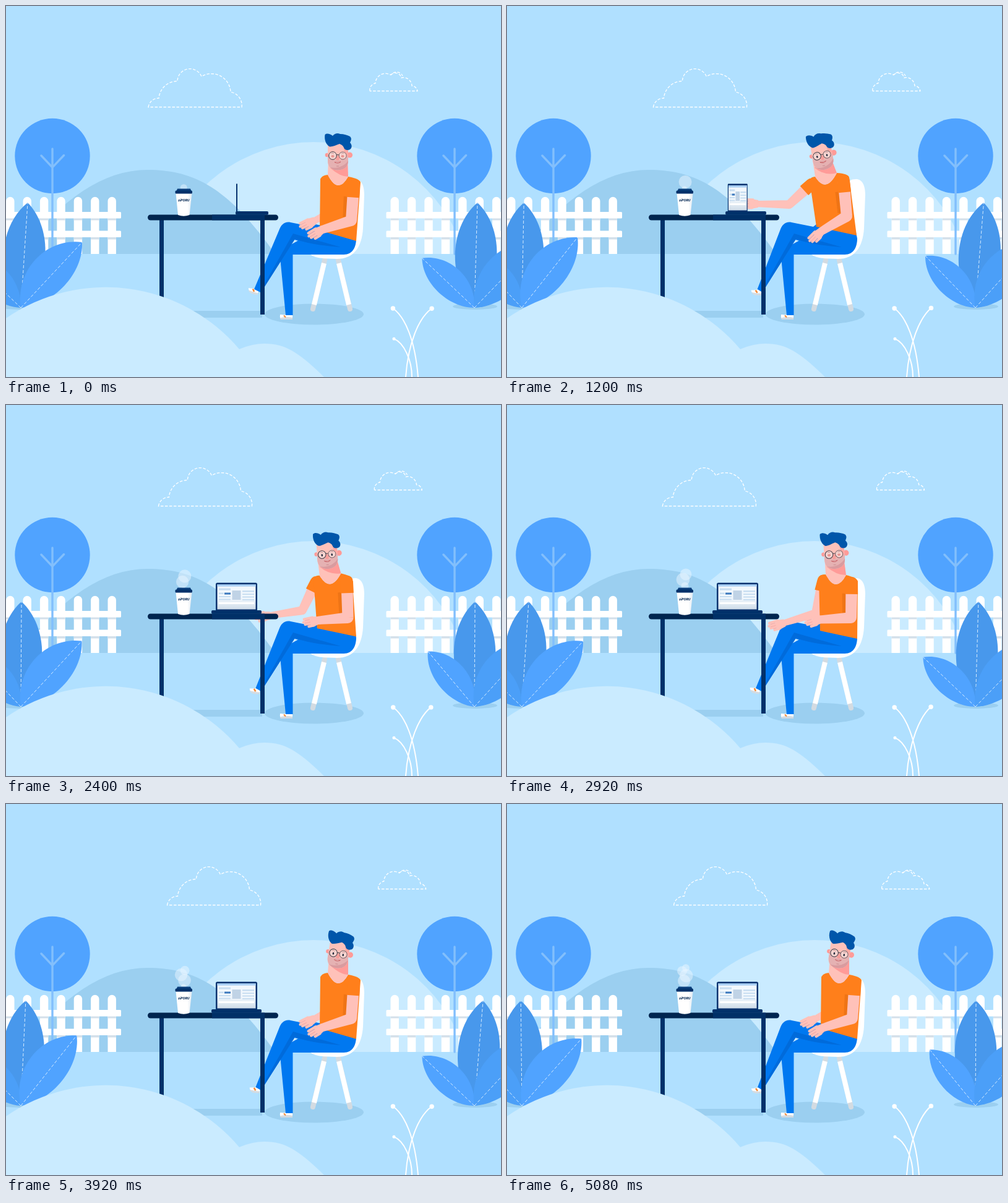
An HTML page for the animation above (5120 ms loop, 800 by 600 pixels).

```html
<!DOCTYPE html>
<html lang="en">
<head>
<meta charset="utf-8">
<title>Working in the garden</title>
<style>
  html, body { margin: 0; width: 100%; height: 100%; overflow: hidden; background: #b0e0ff; }
  svg { display: block; width: 100vw; height: 100vh; }
</style>
</head>
<body>
<svg viewBox="0 0 800 600">
  <defs>
    <g id="cloudBig"><path d="M230 163.500A17 17 0 0 1 247 149A30 30 0 0 1 277 121.500A20.300 20.300 0 0 1 316 114A31 31 0 0 1 363 139A22 22 0 0 1 381 163.500Z"/></g>
    <g id="cloudSmall">
      <path d="M588 137.500A11 11 0 0 1 597 125A16.500 16.500 0 0 1 622 111.500A11 11 0 0 1 641 113"/>
      <path d="M622 111.500A10 10 0 0 1 639 116A14 14 0 0 1 656 129A10 10 0 0 1 665 137.500H588"/>
    </g>
    <g id="tree">
      <circle cx="75" cy="242.500" r="60.700" fill="#50a3ff"/>
      <path d="M75 231V401M57 242L75 261L93.500 241.500" fill="none" stroke="#82bffc" stroke-width="3.400" stroke-linecap="round"/>
    </g>
    <linearGradient id="cupShade"><stop offset=".72" stop-color="#fff"/><stop offset="1" stop-color="#dfe9f2"/></linearGradient>
    <linearGradient id="screenShade" x2="0" y2="1"><stop offset=".55" stop-color="#f2f8fd"/><stop offset="1" stop-color="#cfdce8"/></linearGradient>
  </defs>

  <rect width="800" height="600" fill="#b0e0ff"/>
  <path d="M253.500 401A255 255 0 0 1 741.500 401Z" fill="#caebff"/>
  <path d="M21 401Q124.500 265 228 265C304 265 358 293 435 401Z" fill="#9bcff0"/>
  <g fill="none" stroke="#fff" stroke-width="1.300" stroke-dasharray="4.500 2.500">
    <use href="#cloudBig" id="c1"/><use href="#cloudSmall" id="c2"/>
  </g>

  <g id="fences"></g>
  <use href="#tree"/><use href="#tree" x="650"/>
  <ellipse cx="24" cy="486" rx="36" ry="5" fill="#9bcff0"/>
  <ellipse cx="758" cy="486" rx="36" ry="5" fill="#9bcff0"/>
  <g id="leaves"></g>

  <path d="M290 493H414V504H290Z" fill="#9bcff0"/>
  <ellipse cx="498" cy="498.500" rx="80" ry="17" fill="#9bcff0"/>

  <g id="chair" fill="none" stroke-linecap="round">
    <path d="M515 411L496 490M537 411L556 490" stroke="#d3dbe2" stroke-width="8"/>
    <path d="M514 416L498 483M538 416L554 483" stroke="#fff" stroke-width="8" stroke-linecap="butt"/>
    <path d="M492 402C500 408 515 409 535 409C562 409 575 390 577 360L579 305C579 290 574 280 564 280C556 280 551 283 550 290V398Z" fill="#fff"/>
  </g>

  <g id="man">
    <path d="M443 499C450 500 457 499 463 499V506.500H444Q442 503 443 499Z" fill="#fff"/>
    <path d="M443 504.500Q453 502 463 504V507H444Z" fill="#d3dbe2"/>
    <path d="M449 500.500L452 503.500" stroke="#f58a35" stroke-width="2"/>
    <path d="M442 396L452 500H463.500V402H546C560 402 566 390 566 376L500 364Z" fill="#0078f0"/>
    <g id="foot">
      <path d="M412 458C406 458 402 460 395 460Q395 465 402 467H411Z" fill="#fff"/>
      <path d="M395.500 463.500Q403 465 412 465L411 468H402Q397 467 395.500 463.500Z" fill="#d3dbe2"/>
      <path d="M402 460L405 464" stroke="#f58a35" stroke-width="2.500"/>
    </g>
    <path id="crossed" fill="#0078f0"/>
    <path d="M464 368L541 390Q495 387 467 377L418 454L413 458Z" fill="#006bdb"/>
    <g fill="#ffc1b9">
      <path id="farArm"/>
      <g id="farHand"></g>
    </g>
    <path id="farSleeve" fill="#ff7f1b"/>
    <path id="torso" fill="#ff7f1b"/>
    <path id="armShade" fill="#ef7415"/>
    <path id="neck" fill="#ffc1b9"/>
    <path id="neckShade" fill="#ff9b98"/>
    <g id="head">
      <circle cx="19.500" cy="-1" r="4.600" fill="#ff9b98"/>
      <circle cx="-17" cy="-1" r="3.300" fill="#ff9b98"/>
      <path d="M-16 -20H17V8C17 19 9 23.500 0 23.500C-10 23.500 -16 18 -16 8Z" fill="#ffc1b9"/>
      <path d="M9 -19H17V4H12Z" fill="#ffa9a4"/>
      <path d="M-16 -3V8C-16 18 -10 23.500 0 23.500C9 23.500 17 19 17 8V-1Q10 7 0 7T-16 -3Z" fill="#e5b1b2"/>
      <path d="M17 8C17 19 9 23.500 0 23.500C-5 23.500 -9 22 -12 19C0 22 12 16 17 8Z" fill="#d99b9f"/>
      <path d="M-20.500 -34C-17 -37 -12 -35 -8 -32C-5 -36 0 -37 4 -35C10 -35 16 -33 20 -31C23 -28 22 -25 20 -21C24 -17 23 -12 20 -10C16 -8 11 -9 10 -13C9 -16 6 -18 3 -19C-3 -17 -8 -14 -13 -14.500C-19 -18 -22 -26 -20.500 -34Z" fill="#0056aa"/>
      <ellipse cx="0" cy="4" rx="3" ry="4" fill="#f79e9b"/>
      <path d="M-5 10.500Q0 14.500 5 10Q0 12 -5 10.500Z" fill="#fff" stroke="#c4575b" stroke-width=".8"/>
      <path d="M-2 17H2" stroke="#c98d91" stroke-width="1"/>
      <g fill="#f7d5d1" stroke="#3a3a44" stroke-width="1">
        <circle cx="-8" r="6.300"/><circle cx="8.200" r="6" stroke="#77656a"/><path d="M-2 -1Q0 -2 2 -1" fill="none"/>
      </g>
      <g id="eyesOpen" fill="#232a3c"><ellipse cx="-8" cy="1" rx="1.300" ry="1.900"/><ellipse cx="8" cy="1" rx="1.300" ry="1.900"/></g>
      <g id="eyesShut" fill="#e99490"><ellipse cx="-8" cy="1" rx="2.600" ry="2"/><ellipse cx="8" cy="1" rx="2.600" ry="2"/></g>
      <path d="M-10.500 -3.500Q-8 -4.500 -6 -3M6 -3Q8 -4.500 10.500 -3.500" fill="none" stroke="#b98384" stroke-width=".8"/>
    </g>
    <g fill="#ffc1b9"><g id="nearHand"></g><path id="nearArm"/></g>
    <path id="nearSleeve" fill="#ff7f1b"/>
  </g>

  <g id="table">
    <path d="M248 344H255V480H248ZM411 344H418V499H411Z" fill="#00316a"/>
    <rect x="229" y="337.500" width="211" height="9" rx="4.500" fill="#00254f"/>
    <rect x="333" y="337.500" width="85" height="9" fill="#003067"/>
  </g>

  <g id="steam" fill="#e9f6ff" fill-opacity=".5"></g>
  <g id="cup">
    <path d="M274.500 303H300.500L296.500 338Q287 341.500 278 338Z" fill="url(#cupShade)"/>
    <path d="M277 295.500H298L299.500 299H275.500Z" fill="#0b3f7c"/>
    <rect x="273.500" y="298.500" width="27.500" height="5" rx="1.500" fill="#00316a"/>
    <text x="287.200" y="315.500" font-family="Inter, sans-serif" font-size="5" font-weight="800" font-style="italic" text-anchor="middle" fill="#0a2c57">ziPORU</text>
  </g>

  <rect id="lid" y="287.500" height="46" fill="#06326f"/>
  <g id="screen">
    <rect x="2.500" y="290" width="62" height="40.500" fill="url(#screenShade)"/>
    <path d="M2.500 290H64.500V293.500H2.500Z" fill="#a9cff3"/>
    <path d="M5 296.500H24V299.500H5ZM5 303.500H13V306H5ZM43 300H62V302.500H43ZM43 305H62V307H43ZM43 309.500H62V311.500H43ZM43 314H62V316H43ZM5 309H24V311H5ZM5 313.500H24V315.500H5Z" fill="#c8def1"/>
    <path d="M26.500 300H40.500V315H26.500Z" fill="#c0d3e6"/>
    <path d="M14 303.500H24V306.500H14Z" fill="#3b78bd"/>
    <path d="M5 319H62V322H5Z" fill="#fff"/>
  </g>
  <rect id="base" y="332" height="5.800" rx="2" fill="#00316a"/>

  <path d="M0 505A283 283 0 0 1 377 555Q398 546 418 546C452 546 474 561 514 600H0Z" fill="#caebff"/>

  <g id="stalks" fill="none" stroke="#fff" stroke-width="2"></g>
</svg>

<script>
const LOOP = 5120;
const el = Object.fromEntries([...document.querySelectorAll('[id]')].map(e => [e.id, e]));
const set = (e, attrs) => { for (const k in attrs) e.setAttribute(k, attrs[k]); };
const add = (parent, tag, attrs) => {
  const e = document.createElementNS('http://www.w3.org/2000/svg', tag);
  set(e, attrs);
  return parent.appendChild(e);
};
const mix = (a, b, k) => [a[0] + (b[0] - a[0]) * k, a[1] + (b[1] - a[1]) * k];
const pt = p => p[0].toFixed(2) + ' ' + p[1].toFixed(2);

// Swings between -1 and 1; `peak` is a time of 1
const swing = (t, peak, period) => Math.cos((t - peak) / period * Math.PI * 2);
// Leaf swing, lingering at both ends
const sway = (t, peak) => Math.sin(Math.PI / 2 * swing(t, peak, 2920));

// Smooth monotone interpolation through keys
function track(ts, vs, t) {
  const last = ts.length - 1;
  if (t <= ts[0]) return vs[0];
  if (t >= ts[last]) return vs[last];
  let i = 0;
  while (t > ts[i + 1]) i++;
  const d = j => (vs[j + 1] - vs[j]) / (ts[j + 1] - ts[j]);
  const slope = j => {
    if (j < 1 || j >= last) return 0;
    const a = d(j - 1), b = d(j);
    return a * b <= 0 ? 0 : 2 * a * b / (a + b);
  };
  const h = ts[i + 1] - ts[i], u = (t - ts[i]) / h, s = u * u * (3 - 2 * u);
  return vs[i] * (1 - s) + vs[i + 1] * s +
    h * u * (1 - u) * ((1 - u) * slope(i) - u * slope(i + 1));
}

// Poses: head x, y, tilt | collar left, right | shoulder left | waist left, right | shoulder right
// | far arm: shoulder, elbow, wrist | near arm: same | thumbs
const rest  = [536, 242, 0, 520, 273, 553, 276, 508, 280, 507, 363, 566, 380, 573, 285,
  521, 292, 521, 336, 497, 348, 562, 292, 558, 347, 510, 362, 0, 0];
const reach = [506, 242, -5, 497, 275, 531, 269, 488, 282, 501, 357, 565, 371, 552, 277,
  490, 287, 447, 315, 396, 317, 542, 283, 547, 340, 509, 367, 1, 0];
const turn  = [509, 241.5, -10, 498, 276, 533, 270, 489, 282, 500, 357, 565, 371, 553, 277,
  492, 288, 456, 321, 403, 320, 544, 283, 549, 340, 507, 365, .6, 0];
const push  = [512.5, 241.5, -3, 501, 277, 537, 270, 492, 283, 500, 357, 566, 372, 555, 278,
  495, 289, 467, 327, 414, 327, 547, 284, 550, 344, 503, 350, 0, 1];
const back  = [528.5, 241.5, -4, 515, 274, 548, 275, 504, 280, 506, 365, 566, 378, 567, 285,
  511, 284, 499, 337, 446, 353, 557, 288, 556, 344, 505, 347, 0, 0];
const relax = [537, 242, 9, ...rest.slice(3)];
const poseTimes = [0, 80, 640, 840, 1200, 1560, 1840, 2920, 3400, LOOP];
const poses = [rest, rest, reach, reach, turn, push, push, back, relax, relax];

const disc = ([x, y], r) => `M${pt([x - r, y])}a${r} ${r} 0 1 0 ${2 * r} 0a${r} ${r} 0 1 0 ${-2 * r} 0Z`;

// Tapered segment from p to q
function taper(p, q, w, v) {
  const dx = q[0] - p[0], dy = q[1] - p[1], l = Math.hypot(dx, dy) || 1;
  const off = (o, r) => pt([o[0] - dy / l * r, o[1] + dx / l * r]);
  return `M${off(p, w)}L${off(q, v)}L${off(q, -v)}L${off(p, -w)}Z`;
}

// Leaf from root to tip, with control offsets on each side
function leaf(root, tip, left, right) {
  const dx = tip[0] - root[0], dy = tip[1] - root[1], l = Math.hypot(dx, dy);
  const at = (k, w) => pt([root[0] + dx * k + dy / l * w, root[1] + dy * k - dx / l * w]);
  return `M${pt(root)}C${at(.26, left)} ${at(.76, left)} ${pt(tip)}C${at(.76, -right)} ${at(.26, -right)} ${pt(root)}Z`;
}

// Leaves: root, tip at time, widths, colour
const leaves = [
  [[24, 488], t => [29 + 7 * sway(t, 395), 318], 45, 45, '#4898ec'],
  [[24, 488], t => [-58 + 6 * sway(t, 1800), 404], 28, 36, '#4b9ff8'],
  [[24, 488], t => [118.5 + 4.5 * sway(t, -150), 378 + 4 * sway(t, -150)], 48, 36, '#50a3ff'],
  [[757, 488], t => [764.5 + 6.5 * sway(t, 850), 318], 45, 45, '#4898ec'],
  [[757, 488], t => [676.8 + 6.4 * sway(t, 1960), 403.5 - 6.3 * sway(t, 1960)], 29, 36, '#50a3ff'],
  [[757, 488], t => [854 + 5 * sway(t, 300), 383], 48, 36, '#4b9ff8'],
].map(([root, tip, left, right, fill]) => ({
  root, tip, left, right,
  shape: add(el.leaves, 'path', { fill }),
  vein: add(el.leaves, 'path', { stroke: '#d6ecff', 'stroke-width': 1, 'stroke-dasharray': '5 3' }),
}));

// Fences: rail start, first picket, picket step
for (const [rail, first, step] of [[-14, 164.5, -27.4], [614.5, 621.5, 27.4]]) {
  for (let i = 0; i < 7; i++) {
    const x = first + i * step;
    add(el.fences, 'path', { d: `M${x} 401V315.500a6.700 6.700 0 0 1 13.400 0V401Z`, fill: '#fff' });
    add(el.fences, 'path', { d: `M${x} 343h13.400v3.500h-13.400zM${x} 374h13.400v3.500h-13.400z`, fill: '#d4e0ea' });
  }
  for (const y of [333, 363.5]) add(el.fences, 'rect', { x: rail, y, width: 200, height: 10.5, rx: 1.5, fill: '#fff' });
}

// Hands point along +x from the wrist
function makeHand(g) {
  add(g, 'path', { d: 'M-3 -6L9 -8.500Q14 0 9 8L-3 6Z' });
  [[-6.5, 16], [-2, 21], [2, 23], [6.5, 21]].forEach(([y, x]) => {
    add(g, 'path', { d: `M7 ${y}L${x} ${y}`, stroke: '#ffc1b9', 'stroke-width': 4.2, 'stroke-linecap': 'round' });
  });
  add(g, 'path', { d: 'M12 -4.200H18M12 0H21M12 4.200H20', stroke: '#f5a09b', 'stroke-width': .7 });
  return add(g, 'path', { d: 'M5 4L9 12', stroke: '#ffc1b9', 'stroke-width': 5, 'stroke-linecap': 'round' });
}
const farThumb = makeHand(el.farHand), nearThumb = makeHand(el.nearHand);

// Steam and stalks
const puffs = [[-400, 2], [1000, -4], [2400, 3], [3700, -2]].map(([born, drift]) =>
  ({ born, drift, dot: add(el.steam, 'circle', {}) }));
const stalks = [3.7, 3.7, 2.5].map(r => ({
  line: add(el.stalks, 'path', {}),
  dot: add(el.stalks, 'circle', { r, fill: '#fff', stroke: 'none' }),
}));

function drawArm(name, s, e, w, [ws, we, ww], bend, thumb, thumbEl) {
  el[name + 'Arm'].setAttribute('d', taper(s, e, ws, we) + disc(e, we) + taper(e, w, we, ww));
  el[name + 'Sleeve'].setAttribute('d', disc(s, ws + .5) + taper(s, mix(s, e, .32), ws + .5, ws + 1));
  const angle = Math.atan2(w[1] - e[1], w[0] - e[0]) * 180 / Math.PI - bend;
  set(el[name + 'Hand'], { transform: `translate(${pt(w)}) rotate(${angle})` });
  set(thumbEl, { transform: `scale(${thumb})` });
}

function drawMan(t) {
  const v = rest.map((_, i) => track(poseTimes, poses.map(p => p[i]), t));
  const p = i => [v[i], v[i + 1]];
  const [hx, hy, tilt] = v;
  const [a, b, l, w1, w2, r] = [3, 5, 7, 9, 11, 13].map(p);
  const scoop = pt([(a[0] + b[0]) / 2, (a[1] + b[1]) / 2 + 31]);

  el.torso.setAttribute('d',
    `M${pt(a)}Q${scoop} ${pt(b)}Q${pt([r[0] - 2, r[1] - 6])} ${pt(r)}L${pt(w2)}Q${pt(mix(w1, w2, .5))} ${pt(w1)}L${pt(l)}Q${pt([l[0] + 2, l[1] - 6])} ${pt(a)}Z`);
  el.neck.setAttribute('d', `M${pt(a)}Q${scoop} ${pt(b)}L${pt([hx + 16, hy + 8])}H${hx - 15}Z`);
  el.neckShade.setAttribute('d', `M${pt([hx - 12, hy + 20])}L${pt([hx + 16, hy + 8])}L${pt(b)}Q${pt([hx + 4, hy + 34])} ${pt([hx - 12, hy + 20])}Z`);
  set(el.head, { transform: `translate(${hx} ${hy}) rotate(${tilt})` });

  const shut = t < 80 || (t >= 2840 && t < 3000);
  set(el.eyesOpen, { opacity: shut ? 0 : 1 });
  set(el.eyesShut, { opacity: shut ? 1 : 0 });

  drawArm('far', p(15), p(17), p(19), [9, 7, 5], 0, v[27], farThumb);
  const s = p(21), e = p(23);
  drawArm('near', s, e, p(25), [9.5, 9, 6.5], 14 * (1 - v[28]), v[28], nearThumb);
  const shift = q => [q[0] - 6, q[1]];
  el.armShade.setAttribute('d', taper(shift(mix(s, e, .3)), shift(mix(s, e, .9)), 9, 8));

  const k = track([0, 720, 1200, 1840, 2920, 3920, 5080], [1, 0, .1, 0, .75, .4, 0], t);
  set(el.foot, { transform: `translate(${-3 * k} ${-k}) rotate(${12 * k} 409 459)` });
  el.crossed.setAttribute('d',
    `M564 366L500 353L495 357L460 350C450 348 445 354 442 361L${405 - 4 * k} 458L${413 - 2 * k} 463L466 378L540 399Q562 398 566 376Z`);
}

function drawLaptop(t) {
  const k = track([840, 1200, 1560], [0, .46, 1], t);
  const x = 372 - 33 * k, width = 2 + 65 * k;
  set(el.lid, { x, width, rx: 2.5 * k });
  set(el.screen, { transform: `translate(${x} 0) scale(${width / 67} 1)`, opacity: k > 0 ? 1 : 0 });
  set(el.base, { x: 371 - 39 * k, width: 53 + 28 * k });
}

function drawScenery(t) {
  const s = t / 1000, drift = s * (7.85 - .23 * (4.5 - s) ** 2);
  set(el.c1, { x: drift });
  set(el.c2, { x: drift * .45 });

  for (const f of leaves) {
    const tip = f.tip(t);
    f.shape.setAttribute('d', leaf(f.root, tip, f.left, f.right));
    f.vein.setAttribute('d', `M${pt(f.root)}L${pt(tip)}`);
  }

  for (const { born, drift: dx, dot } of puffs) {
    const age = t - born;
    set(dot, {
      cx: 287 + dx * Math.min(1, Math.max(0, age) / 3000),
      cy: 297 - .0086 * age + 5e-7 * age * age,
      r: age < 0 ? 0 : track([0, 400, 1600, 2400, 3300, 5500], [3, 5.5, 10.5, 11, 9.5, 6], age),
    });
  }

  const q = swing(t, 0, 1960);
  const tips = [[625.8 - .4 * q, 489], [686.6 + 1.5 * q, 488.8 + .5 * q], [627, 538.2]];
  const ends = ['C645 503 661 540 666 600', 'C667 504 650 545 646 600', 'C643 545 656 572 656 600'];
  stalks.forEach(({ line, dot }, i) => {
    line.setAttribute('d', `M${pt(tips[i])}${ends[i]}`);
    set(dot, { cx: tips[i][0], cy: tips[i][1] });
  });
}

function draw(t) {
  drawScenery(t);
  drawMan(t);
  drawLaptop(t);
}

const start = performance.now();
function tick() {
  const t = (performance.now() - start) % LOOP;
  draw(Math.floor(t / 40) * 40);
  requestAnimationFrame(tick);
}
tick();
</script>
</body>
</html>
```
